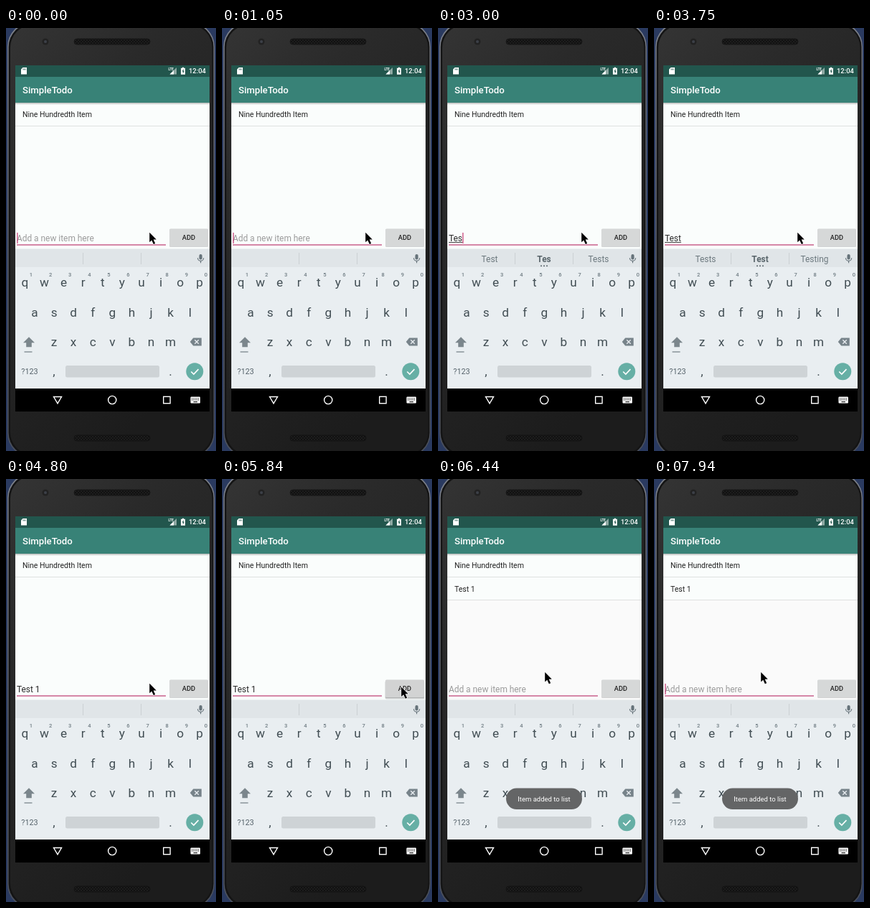
An HTML page for the animation above (8000 ms loop, 293 by 589 pixels).

```html
<!DOCTYPE html>
<html lang="en">
<head>
<meta charset="utf-8">
<title>Todo list</title>
<style>
html, body { margin: 0; width: 100%; height: 100%; overflow: hidden; background: #2a3a60; }
svg { display: block; width: 293px; height: 589px; font-family: Roboto, sans-serif; }
.mid { text-anchor: middle; }
.line { fill: none; stroke: #fff; stroke-width: 1.4; }
.key { font-size: 17.2px; fill: #414d53; }
.num { font-size: 7.5px; font-weight: 500; fill: #6f7c83; }
.word { font-size: 11.9px; fill: #6c787e; }
.item { font-size: 10.5px; fill: #222; }
</style>
</head>
<body>
<svg viewBox="0 0 293 589">
  <defs>
    <linearGradient id="shade" x2="0" y2="1">
      <stop stop-color="#000" stop-opacity=".28"/><stop offset="1" stop-color="#000" stop-opacity="0"/>
    </linearGradient>
    <linearGradient id="body" x2=".5" y2="1">
      <stop stop-color="#343434"/><stop offset=".3" stop-color="#2a2a2a"/><stop offset="1" stop-color="#1c1c1c"/>
    </linearGradient>
    <linearGradient id="rim" x2="0" y2="1">
      <stop stop-color="#7d818a"/><stop offset=".5" stop-color="#5b606c"/><stop offset="1" stop-color="#4a4f5a"/>
    </linearGradient>
    <pattern id="mesh" width="4" height="4" patternUnits="userSpaceOnUse">
      <rect width="4" height="4" fill="#111"/><circle cx="1" cy="1" r=".8" fill="#2c2c2c"/><circle cx="3" cy="3" r=".8" fill="#2c2c2c"/>
    </pattern>
  </defs>

  <!-- phone -->
  <rect x="2" y="-8" width="289" height="606" rx="34" fill="url(#rim)"/>
  <rect x="3.6" y="-6.5" width="286" height="603" rx="33" fill="#141414"/>
  <rect x="6" y="-4" width="281.5" height="598" rx="31" fill="url(#body)"/>
  <rect x="95" y="15" width="106" height="8" rx="4" fill="url(#mesh)" stroke="#161616"/>
  <rect x="95" y="567" width="106" height="8" rx="4" fill="url(#mesh)" stroke="#121212"/>
  <circle cx="55" cy="19" r="4.5" fill="#222"/><circle cx="55" cy="19" r="2" fill="#3c4048"/>

  <!-- app -->
  <rect x="13" y="52" width="271" height="482" fill="#fafdfc"/>
  <rect id="blank" x="13" y="169" width="271" height="139" fill="#fafafa"/>
  <rect x="13" y="52" width="271" height="16" fill="#22564d"/>
  <rect x="13" y="68" width="271" height="36" fill="#388277"/>
  <rect x="13" y="104" width="271" height="3" fill="url(#shade)"/>
  <path d="M23.5 55H29v9.5h-8V57.5z" fill="#fff"/>
  <path d="M24 56.5v2M25.6 56.5v2M27.2 56.5v2" stroke="#22564d" stroke-width=".8"/>
  <path d="M238 55v9.5h-9.5z" fill="#8fa9a4"/><path d="M234 59v5.5h-5.5z" fill="#fff"/>
  <text x="226.5" y="58.5" font-size="4.5" font-weight="700" fill="#fff">LTE</text>
  <path d="M246 54.7h2v1h2v9h-6v-9h2z" fill="#fff"/>
  <path d="M247.6 57l-2 3.6h1.2v2.9l2-3.8h-1.2z" fill="#22564d"/>
  <text x="255" y="63.3" font-size="9.4" font-weight="500" fill="#fff">12:04</text>
  <text x="23" y="91" font-size="13.2" font-weight="500" fill="#fff">SimpleTodo</text>
  <text class="item" x="23" y="124">Nine Hundredth Item</text>
  <path d="M13 136.5h271" stroke="#dfe2e1"/>
  <g id="added">
    <text class="item" x="23" y="157">Test 1</text>
    <path d="M13 168.5h271" stroke="#dfe0e0"/>
  </g>

  <!-- entry -->
  <path d="M15 302h208" stroke="#c8618b" stroke-width="1.6"/>
  <text id="hint" x="15" y="297" font-size="11.9" fill="#9b9b9b">Add a new item here</text>
  <text id="entry" x="15" y="297" font-size="11.9" fill="#2b2b2b"></text>
  <rect id="under" x="15" y="298" height="1" fill="#444"/>
  <rect id="caret" y="285" width="1.3" height="15" fill="#c8487c"/>
  <rect id="lift" x="227.5" y="281" width="55" height="25.5" rx="2" fill="#000"/>
  <rect x="228" y="280.5" width="54" height="24.5" rx="1.5" fill="#000" opacity=".16"/>
  <rect id="button" x="228" y="279.5" width="54" height="24.5" rx="1.5"/>
  <text class="mid" x="255" y="295.2" font-size="9.3" font-weight="500" fill="#222">ADD</text>

  <!-- keyboard -->
  <rect x="13" y="307.5" width="271" height="26" fill="#e0e5e8"/>
  <rect x="13" y="333" width="271" height="169" fill="#e9eef1"/>
  <path d="M107.5 313v16M188.5 313v16" stroke="#cbd1d4"/>
  <g id="words"></g>
  <g id="dots" fill="#59656b"><circle cx="144" cy="331.3" r="1"/><circle cx="148" cy="331.3" r="1"/><circle cx="152" cy="331.3" r="1"/></g>
  <rect x="269.5" y="315" width="4.2" height="7.6" rx="2.1" fill="#66737a"/>
  <path d="M267.5 320.2a4.1 4.1 0 0 0 8.2 0M271.6 324.3v3" fill="none" stroke="#66737a" stroke-width="1.2"/>
  <g id="keys"></g>
  <path d="M32 430.3l8 8h-4.2v6h-7.6v-6h-4.2z" fill="#7b868c"/>
  <path d="M25.5 451h11" stroke="#7b868c" stroke-width="1.3"/>
  <path d="M261.3 431.5h11.5v11h-11.5l-4.5-5.5z" fill="#77838a"/>
  <path d="M263.3 434.3l5.5 5.5m0-5.5l-5.5 5.5" stroke="#e9eef1" stroke-width="1.3"/>
  <text class="mid" x="33" y="482" font-size="10.8" fill="#55626a">?123</text>
  <rect x="83" y="470" width="131" height="16.5" rx="2.5" fill="#ced3d6"/>
  <circle cx="263.3" cy="478.3" r="12" fill="#66afa5"/>
  <path d="M258.3 478.5l3.6 3.6 6.6-7" class="line" style="stroke-width:1.6"/>

  <!-- navigation -->
  <rect x="13" y="502" width="271" height="32"/>
  <path class="line" d="M66.5 513.5h11l-5.5 9.3z"/>
  <circle class="line" cx="148.2" cy="518" r="5.6"/>
  <rect class="line" x="219.7" y="513.3" width="9.4" height="9.4"/>
  <rect x="257.5" y="513.5" width="13.5" height="9" rx="1" fill="#fff"/>
  <path d="M259 516h10.5M259 518h10.5" stroke="#000" stroke-dasharray="1.2 1"/>
  <path d="M261.5 520.6h5.5" stroke="#000"/>

  <g id="toast">
    <rect x="95" y="430.5" width="106" height="29.5" rx="14.7" fill="#646566"/>
    <text class="mid" x="148" y="449" font-size="9.5" fill="#fff">Item added to list</text>
  </g>
  <path id="mouse" d="M0 0V13.5L3.1 10.7 5.6 16.3 8 15.2 5.5 9.8H9.6z" stroke="#fff" stroke-width="1.2" paint-order="stroke"/>
</svg>
<script>
const $ = id => document.getElementById(id);
const LOOP = 8000;

function label(parent, cls, x, y, str) {
  const t = document.createElementNS("http://www.w3.org/2000/svg", "text");
  t.setAttribute("class", "mid " + cls);
  t.setAttribute("x", x);
  t.setAttribute("y", y);
  t.textContent = str;
  parent.append(t);
  return t;
}

const rows = [["qwertyuiop", 26.3, 360], ["asdfghjkl", 40, 401.5], ["zxcvbnm", 67, 443]];
for (const [chars, x, y] of rows)
  [...chars].forEach((c, i) => label($("keys"), "key", x + 27.1 * i, y, c));
[..."1234567890"].forEach((c, i) => label($("keys"), "num", 35 + 27.1 * i, 345.5, c));
label($("keys"), "key", 67, 484, ",");
label($("keys"), "key", 229.5, 484, ".");

const words = [72, 148, 224].map(x => label($("words"), "word", x, 325.5, ""));
words[1].style.cssText = "font-weight:700;fill:#59656b";

// Each step changes only the listed fields.
const steps = [
  [0, { text: "", caret: 1, words: [], mouse: [200.2, 284.7], press: 0, added: 0, toast: 0, compose: 0 }],
  [450, { caret: 0 }],
  [1050, { caret: 1 }],
  [1500, { caret: 0 }],
  [1950, { caret: 1 }],
  [2550, { text: "T", compose: 1 }],
  [2700, { words: ["The", "T", "This"] }],
  [2850, { text: "Te", words: ["Tell", "Te", "Test"] }],
  [3000, { text: "Tes", words: ["Test", "Tes", "Tests"] }],
  [3150, { text: "Test" }],
  [3300, { words: ["Tests", "Test", "Testing"] }],
  [3750, { caret: 0 }],
  [4200, { text: "Test ", caret: 1, words: [], compose: 0 }],
  [4350, { text: "Test 1" }],
  [4800, { caret: 0 }],
  [5090, { mouse: [215, 286] }],
  [5240, { mouse: [240, 289] }],
  [5390, { mouse: [250.2, 289.5], caret: 1 }],
  [5840, { caret: 0, press: 1 }],
  [5990, { text: "", caret: 1, added: 1, press: 2 }],
  [6140, { toast: .6 }],
  [6290, { toast: .9, press: 0, mouse: [205, 279] }],
  [6440, { toast: 1, caret: 0, mouse: [149.2, 269] }],
  [6890, { caret: 1 }],
  [7340, { caret: 0 }],
  [7940, { caret: 1 }]
];

const show = (id, on) => { $(id).style.opacity = +on; };

function draw(s) {
  const entry = $("entry");
  entry.textContent = s.text;
  // A trailing space is collapsed when measured, so add its width.
  const width = s.text ? entry.getComputedTextLength() + (s.text.endsWith(" ") ? 3 : 0) : 0;
  $("caret").setAttribute("x", 15.2 + width);
  $("under").setAttribute("width", s.compose ? width : 0);
  show("hint", !s.text);
  show("caret", s.caret);
  words.forEach((w, i) => { w.textContent = s.words[i] || ""; });
  show("dots", s.words.length > 0);
  show("blank", s.added);
  show("added", s.added);
  show("toast", s.toast);
  show("lift", s.press ? .16 : 0);
  $("button").setAttribute("fill", ["#d6d8d8", "#d2d3d3", "#c6c7c7"][s.press]);
  $("mouse").setAttribute("transform", `translate(${s.mouse})`);
}

const start = performance.now();
let last = -1;
function tick() {
  const t = Math.max(0, performance.now() - start) % LOOP;
  const past = steps.filter(([at]) => at <= t);
  if (past.length !== last) {
    last = past.length;
    draw(Object.assign({}, ...past.map(([, fields]) => fields)));
  }
  requestAnimationFrame(tick);
}
tick();
</script>
</body>
</html>
```
